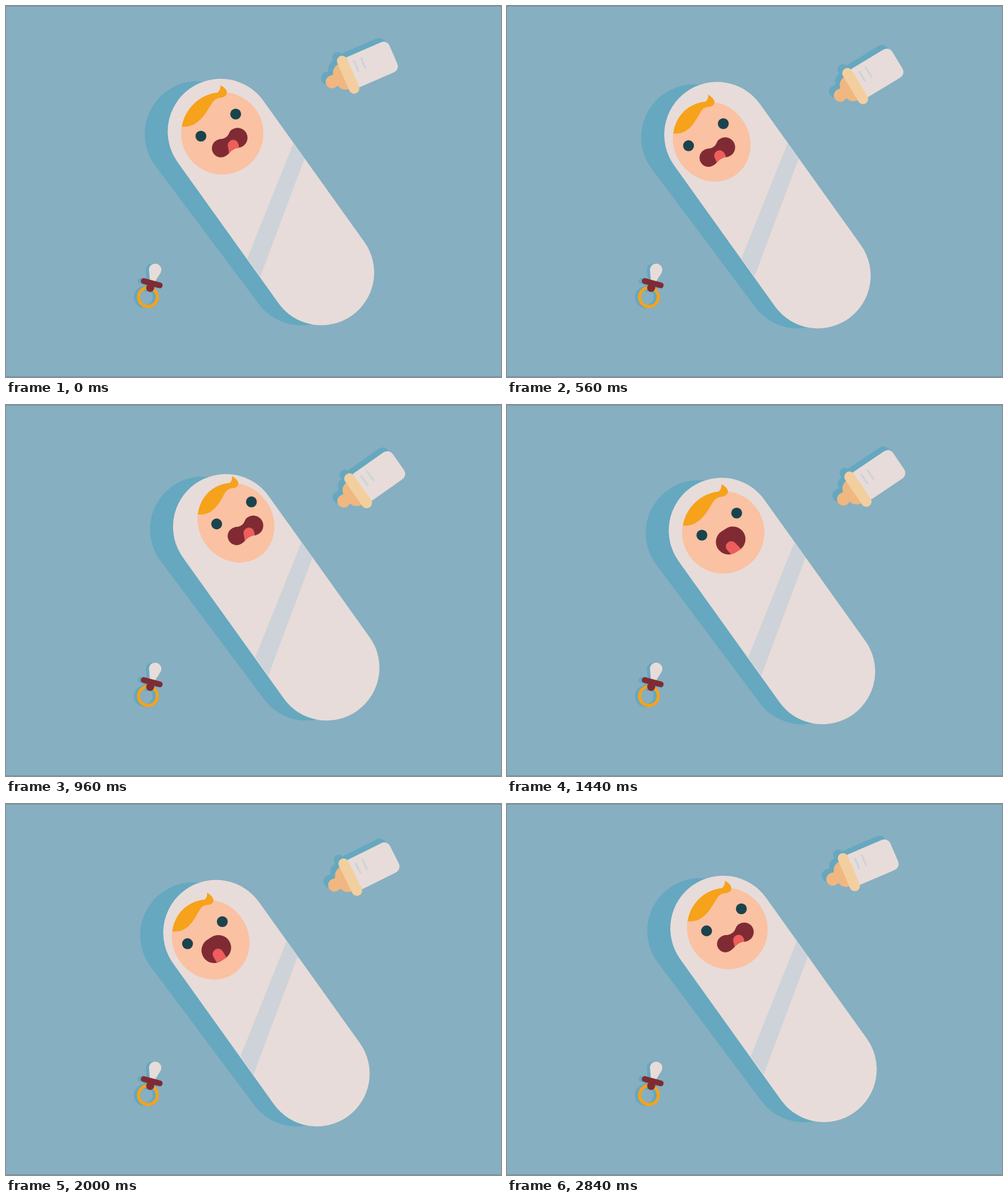
These frames come from a looping animation (800x600 px, 2880 ms). An HTML page:

```html
<!DOCTYPE html>
<html lang="en">
<head>
<meta charset="utf-8">
<title>Swaddled baby</title>
<style>
  html, body { margin: 0; width: 100%; height: 100%; overflow: hidden; background: #86afc1; }
  svg { display: block; width: 100vw; height: 100vh; }
  /* --flat turns a coloured shape into its one-colour shadow */
  .shadow { --flat: #65a8c0; }
  .cloth { fill: var(--flat, #e7dcd9); }
  .nipple { fill: var(--flat, #f0b780); }
  .collar { fill: var(--flat, #f3cf9f); }
  .maroon { fill: var(--flat, #802b33); }
  .mark { stroke: var(--flat, #cdd3d8); stroke-width: 3; }
  .loop { fill: none; stroke: var(--flat, #f6a21a); stroke-width: 5; }
  .capsule { stroke-width: 170.6; stroke-linecap: round; }
</style>
</head>
<body>
<svg viewBox="0 0 800 600">
  <defs>
    <g id="bottle" transform="translate(553 111.2) rotate(-23.5)">
      <circle class="nipple" cx="-28.5" cy=".3" r="10.5"/>
      <path class="nipple" d="M-4-22C-14-22-20-18-22-10.5Q-23-9-26-9.500V9.500Q-23 9-22 10.500C-20 18-14 22-4 22Z"/>
      <rect class="cloth" y="-27" width="80" height="53" rx="10.5"/>
      <rect class="collar" x="-8.5" y="-32.7" width="17" height="65.4" rx="8.5"/>
      <path class="mark" d="M17.7-17.5V2M30-18V1.5"/>
    </g>
    <g id="pacifier">
      <path class="cloth" d="M232.5 446L231.3 429A10 10 0 1 1 249.5 432L240 447Z"/>
      <circle class="loop" cx="229.4" cy="470.8" r="15.2"/>
      <circle class="maroon" cx="233" cy="456" r="6.5"/>
      <rect class="maroon" x="-18" y="-4.7" width="36" height="9.4" rx="4.5" transform="translate(235.5 448.3) rotate(15)"/>
    </g>
    <clipPath id="mouthClip"><path id="mouthHole" transform="translate(362 220.5) rotate(-32.4)"/></clipPath>
  </defs>

  <rect width="800" height="600" fill="#86afc1"/>

  <use href="#pacifier" class="shadow" x="-5"/>
  <use href="#pacifier"/>

  <g class="shadow" transform="translate(-7.5 -6)"><use href="#bottle" class="swing"/></g>
  <use href="#bottle" class="swing"/>

  <g id="body" class="capsule">
    <path d="M309.5 207L477 431" stroke="#65a8c0"/>
    <path d="M346.7 203L509.7 431" stroke="#e7dcd9"/>
  </g>
  <path id="band" d="M464.5 222L482.3 247L411 437.5L390 408Z" fill="#cdd3d8"/>

  <g id="head">
    <circle cx="349.5" cy="206" r="66.5" fill="#fac1a2"/>
    <path fill="#f6a21a" d="M284.3 195A66.5 66.5 0 0 1 342 140Q347.5 135 346.5 128C352 131 357 135 357 140C357 145 352 148 345 148.5C336 150 333 157 328 165C318 182 305 197 284.3 195Z"/>
  </g>
  <g id="features">
    <g fill="#1b434d"><circle cx="315" cy="210.5" r="8.8"/><circle cx="371.2" cy="174.8" r="8.8"/></g>
    <path id="mouth" fill="#802b33" transform="translate(362 220.5) rotate(-32.4)"/>
    <g clip-path="url(#mouthClip)">
      <path id="tongue" stroke="#ef5d5d" stroke-width="17.5" stroke-linecap="round"/>
    </g>
  </g>

  <path d="M0 .5H800M0 599.5H800" stroke="#6c91a3"/>
</svg>
<script>
const LOOP = 2880, HALF = LOOP / 2, STEP = 40;
const $ = id => document.getElementById(id);
const place = (el, transform) => el.setAttribute('transform', transform);
const mix = (a, b, p) => a + (b - a) * p;

// Strong ease in and out: cubic-bezier(.615, 0, .385, 1)
function ease(x) {
  let low = 0, high = 1;
  for (let i = 0; i < 24; i++) {
    const s = (low + high) / 2, r = 1 - s;
    if (3 * r * r * s * .615 + 3 * r * s * s * .385 + s ** 3 < x) low = s; else high = s;
  }
  return low * low * (3 - 2 * low);
}

// Sideways roll: +1 is up and right, -1 is down and left
function roll(t) {
  const w = (t + HALF / 4) % HALF / (HALF / 2);
  return w < 1 ? 1 - 2 * ease(w) : 2 * ease(w - 1) - 1;
}

// 0 is the crying mouth, 1 the round shout; each change springs past its end
function openness(t) {
  const phase = (t + 200) % LOOP, s = phase % HALF;
  const sprung = 1 - Math.exp(-s / 106) * Math.cos(1.5 * Math.PI * s / 200);
  return phase < HALF ? 1 - sprung : sprung;
}

// Two lobes joined by a waist; the shout pulls them into one oval
function mouthPath(open) {
  const to = (cry, shout) => mix(cry, shout, open);
  const x = to(-1.6, .3), y = to(.3, -1.4), spread = to(15.9, 4.2);
  const left = to(14.6, 20.4), right = to(16.1, 20.4);
  const top = y - to(10.7, 20.4), bottom = y + to(12.2, 20.4);
  const x0 = x - spread, x1 = x + spread, near = x - spread / 2, far = x + spread / 2;
  return `M${x0} ${y - left}C${near} ${y - left} ${near} ${top} ${x} ${top}` +
    `S${far} ${y - right} ${x1} ${y - right}A${right} ${right} 0 0 1 ${x1} ${y + right}` +
    `C${far} ${y + right} ${far} ${bottom} ${x} ${bottom}` +
    `S${near} ${y + left} ${x0} ${y + left}A${left} ${left} 0 0 1 ${x0} ${y - left}Z`;
}

// 0 is upright, 1 leans far left
function tongueLean(t, open) {
  const crying = .15 + .35 * Math.max(0, Math.sin(Math.PI * t / 960));
  const shouting = Math.max(0, 1 - ((t - HALF) / 960) ** 2);
  return mix(crying, shouting, open);
}

function draw(t) {
  const v = roll(t), open = openness(t), lean = tongueLean(t, open);
  place($('body'), `translate(${9.1 * v} ${-6.4 * v})`);
  place($('band'), `translate(${13.8 * v} 0)`);
  place($('head'), `translate(${349.5 + 23.5 * v} ${206 - 16.6 * v}) rotate(-35.6) ` +
    `scale(${1 - .105 * Math.abs(v)} 1) rotate(35.6) translate(-349.5 -206)`);
  place($('features'), `translate(${27.1 * v} ${-19.3 * v})`);

  for (const id of ['mouth', 'mouthHole']) $(id).setAttribute('d', mouthPath(open));
  $('tongue').setAttribute('d',
    `M${369.5 + 6.5 * lean} 243L${368 - 5.5 * lean} ${224.5 + 4.5 * lean}`);

  const angle = -5.25 + 6.9 * Math.cos(2 * Math.PI * t / LOOP + .698);
  for (const el of document.querySelectorAll('.swing')) place(el, `rotate(${angle} 695 47)`);
}

const start = performance.now();
function tick() {
  const t = (performance.now() - start) % LOOP;
  draw(Math.floor(t / STEP) * STEP);
  requestAnimationFrame(tick);
}
tick();
</script>
</body>
</html>
```
